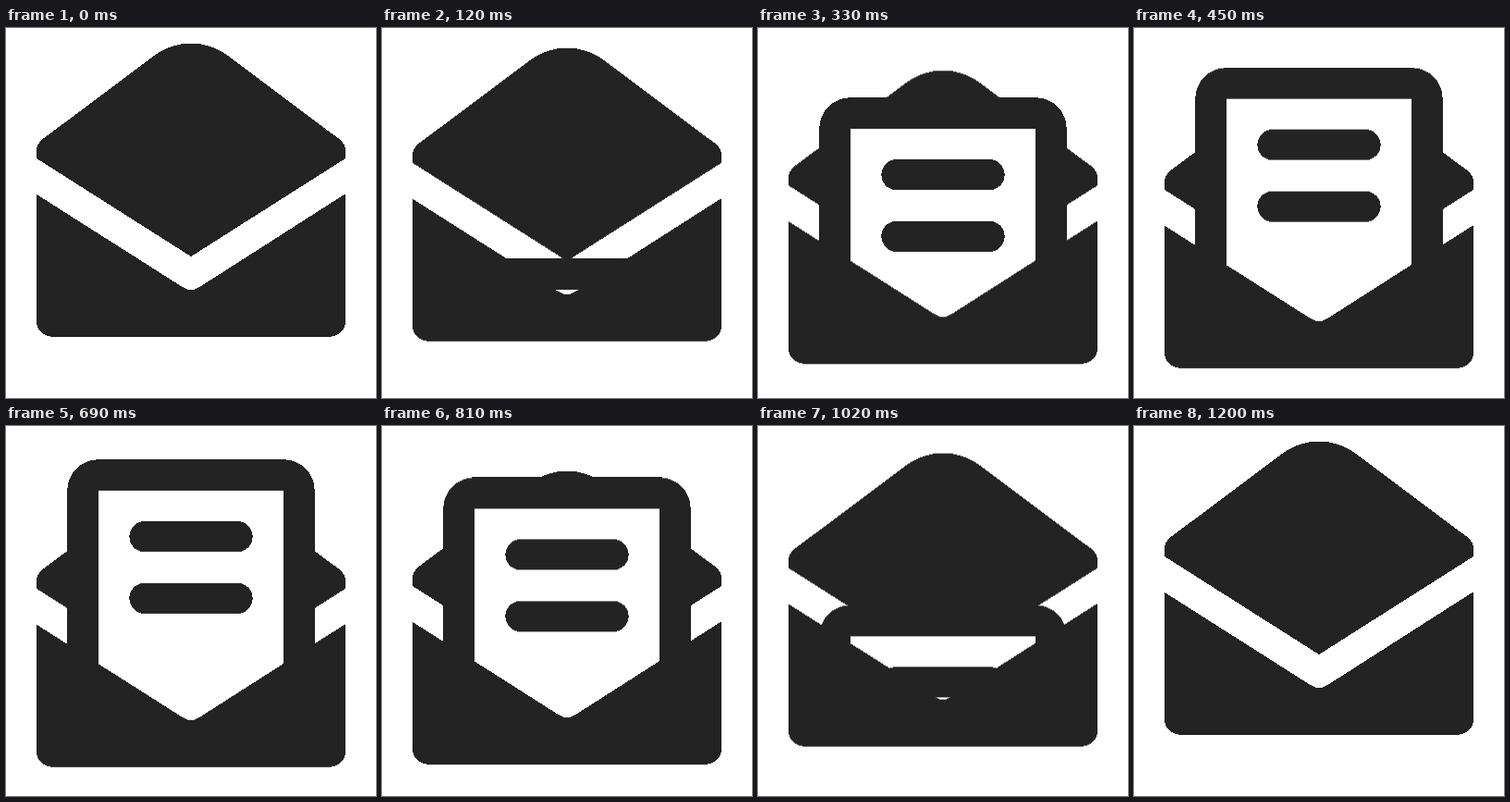
Animation, 400 px wide and 400 px high, one loop 3230 ms. Source, as an HTML page without scripts:

```html
<!DOCTYPE html>
<html lang="en">
<head>
<meta charset="utf-8">
<title>Opening envelope</title>
<style>
  html, body { margin: 0; width: 100%; height: 100%; overflow: hidden; background: #fff; }
  svg { display: block; width: 100%; height: 100%; fill: #232323; shape-rendering: crispEdges; }
  .paper { fill: #fff; }
  .envelope { --rest: 0px; --open: 35.3px; }
  .letter { --rest: 249.8px; --open: -.6px; }
  .envelope, .letter { animation: slide 3230ms infinite; }

  /* 600 ms out, 600 ms back along the mirrored curve, then a pause */
  @keyframes slide {
    0% { transform: translateY(var(--rest)); animation-timing-function: cubic-bezier(.4, 0, .207, 1); }
    18.576% { transform: translateY(var(--open)); animation-timing-function: cubic-bezier(.793, 0, .6, 1); }
    37.152%, 100% { transform: translateY(var(--rest)); }
  }
</style>
</head>
<body>
<svg viewBox="0 0 400 400">
  <defs>
    <clipPath id="pocket"><rect width="400" height="322"/></clipPath>
    <rect id="line" x="133.33" width="133.33" height="33.33" rx="16.67"/>
  </defs>

  <path class="envelope" d="M33 141V133.33A16.67 16.67 0 0 1 39.8 120L160 30A66.67 66.67 0 0 1 240 30L360.2 120A16.67 16.67 0 0 1 367 133.33V141L200 247Z"/>

  <g clip-path="url(#pocket)">
    <g class="letter">
      <path d="M66.3 400V66.67A33.5 33.5 0 0 1 99.8 33.2H300.2A33.5 33.5 0 0 1 333.7 66.67V400Z"/>
      <rect class="paper" x="100" y="66.67" width="200" height="333"/>
      <use href="#line" y="100"/>
      <use href="#line" y="166.67"/>
    </g>
  </g>

  <path class="envelope" d="M33 179.8L191 280.2A16.67 16.67 0 0 0 209 280.2L367 179.2V317A16.67 16.67 0 0 1 350.33 333.67H49.67A16.67 16.67 0 0 1 33 317Z"/>
</svg>
</body>
</html>
```
